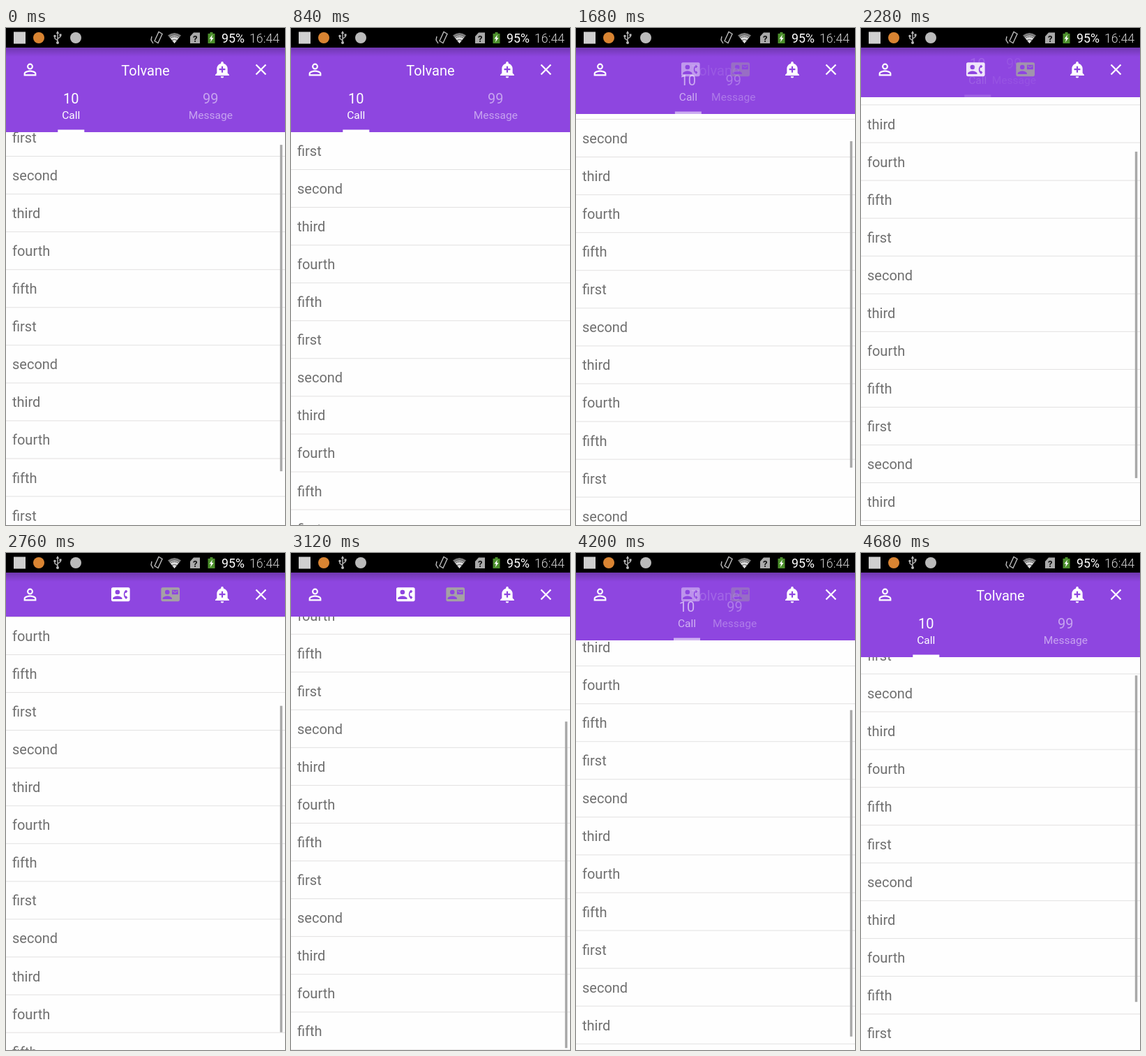
An HTML page for the animation above (4.8 s loop, 400 by 711 pixels).

```html
<!DOCTYPE html>
<html lang="en">
<head>
<meta charset="utf-8">
<title>Collapsing header</title>
<style>
  html, body { margin: 0; width: 100%; height: 100%; overflow: hidden; background: #fefefe; }
  svg { display: block; width: 400px; height: 711px; font: 20px Roboto, sans-serif; fill: #fff; }
  .small { font-size: 15.56px; }
  .mid text { text-anchor: middle; }
  #list text { fill: #707070; }
  #list rect { fill: #e2e1e1; }
</style>
</head>
<body>
<svg viewBox="0 0 400 711">
  <defs>
    <linearGradient id="shade" x2="0" y2="1">
      <stop stop-color="#000" stop-opacity=".22"/>
      <stop offset="1" stop-color="#000" stop-opacity="0"/>
    </linearGradient>
  </defs>

  <g id="list"></g>
  <rect id="bar" x="392.8" width="3.5" height="467" fill="#a9a9a9"/>

  <rect id="header" width="400" fill="#8e46e0"/>
  <rect y="28" width="400" height="13" fill="url(#shade)"/>
  <g class="mid">
    <text id="title" x="200" y="67.5">Tolvane</text>
    <g id="tabs">
      <g id="call">
        <text y="108">10</text>
        <text class="small" y="130.3">Call</text>
        <rect x="-19" y="145.5" width="38" height="3.5"/>
      </g>
      <g id="message" opacity=".5">
        <text y="108">99</text>
        <text class="small" y="130.3">Message</text>
      </g>
    </g>
  </g>
  <g id="fixed" fill-rule="evenodd"></g>
  <g id="fading" fill-rule="evenodd"></g>

  <!-- status bar -->
  <rect width="400" height="28" fill="#000"/>
  <rect x="11" y="5.5" width="17" height="17" fill="#cfcfcf"/>
  <circle cx="47" cy="14" r="8" fill="#d98432"/>
  <g fill="none" stroke="#bbb" stroke-width="1.4">
    <path d="M74 20V7M74 18l-4-3v-3M74 15.5l4-3V10"/>
    <path d="M213 18.5l6-13 5 3-6 13zM209 12l-1 5 3 5"/>
  </g>
  <g fill="#bbb">
    <path d="M71.8 8L74 4l2.2 4z"/>
    <circle cx="74" cy="21" r="2"/>
    <circle cx="70" cy="11.5" r="1.7"/>
    <rect x="76.5" y="8.5" width="3" height="3"/>
    <circle cx="100" cy="14" r="8"/>
  </g>
  <path d="M232 10.5q9.500-7 19 0L241.500 22z" fill="#7b7b7b"/>
  <path d="M234.800 13.500q6.700-5 13.400 0L241.500 22z" fill="#ddd"/>
  <path d="M235.500 14.500q6-4 12 0M238 17.500q3.500-2 7 0" fill="none" stroke="#555"/>
  <path d="M264 12l5-5.500h9V22h-14z" fill="#aaa"/>
  <text x="268" y="19.500" style="font-size:13px;font-weight:700;fill:#111">?</text>
  <path d="M292.500 6h4v2h3v14h-10V8h3z" fill="#4c8f2c"/>
  <path d="M296 9.500l-4.500 6h2.500l-1 5 4.500-6.500H295z"/>
  <text x="309" y="21" style="font-size:17.8px">95%</text>
  <text x="349" y="21" style="font-size:17.8px;font-weight:300;fill:#d0d0d0">16:44</text>
</svg>
<script>
const $ = id => document.getElementById(id);
const set = (id, attrs) => { for (const k in attrs) $(id).setAttribute(k, attrs[k]); };
const clamp = v => Math.max(0, Math.min(1, v));

// Icons are drawn in a 24-unit box
const card = 'M22 3H2C.9 3 0 3.900 0 5v14c0 1.100.9 2 2 2h20c1.100 0 2-.9 2-2V5c0-1.100-.9-2-2-2zM8 6a3 3 0 1 1 0 6 3 3 0 1 1 0-6zm6 12H2v-1c0-2 4-3.100 6-3.100s6 1.100 6 3.100z';
function icon(parent, x, y, d, fill = '#fff') {
  $(parent).insertAdjacentHTML('beforeend',
    `<path transform="translate(${x} ${y}) scale(1.111) translate(-12 -12)" fill="${fill}" d="${d}"/>`);
}
icon('fixed', 34.5, 59.5, 'M12 5.9a2.1 2.1 0 1 1 0 4.2 2.1 2.1 0 0 1 0-4.2m0 9c2.97 0 6.1 1.46 6.1 2.1v1.1H5.9V17c0-.64 3.13-2.1 6.1-2.1M12 4a4 4 0 1 0 0 8 4 4 0 1 0 0-8zm0 9c-2.67 0-8 1.34-8 4v3h16v-3c0-2.66-5.33-4-8-4z');
icon('fixed', 310, 59.2, 'M10 21a2 2 0 0 0 4 0zm8.9-4.200V11c0-3.250-2.250-5.970-5.300-6.690v-.72a1.600 1.600 0 0 0-3.200 0v.72C7.370 5.030 5.120 7.750 5.120 11v5.820L3 18.940V20h18v-1.060zM16 13h-3v3h-2v-3H8v-2h3V8h2v3h3z');
icon('fixed', 365.5, 59.5, 'M19 6.410L17.590 5 12 10.590 6.410 5 5 6.410 10.590 12 5 17.590 6.410 19 12 13.410 17.590 19 19 17.590 13.410 12z');
icon('fading', 164.3, 59.3, card + 'M17.850 14h1.640L21 16l-1.990 1.990a7.500 7.500 0 0 1 0-11.980L21 8l-1.510 2h-1.640a6 6 0 0 0 0 4z');
icon('fading', 235.7, 59.3, card + 'M22 12h-8V6h8zM21 8V7l-3 2-3-2v1l3 2z', '#a5a1a5');

const words = ['first', 'second', 'third', 'fourth', 'fifth'];
const pitch = 54.06;
for (let i = 0; i < 15; i++) {
  const y = i * pitch;
  $('list').insertAdjacentHTML('beforeend',
    `<text x="9" y="${y + 34}">${words[i % 5]}</text><rect y="${y + 53}" width="400" height="1"/>`);
}

// time, list scroll, header bottom
const keys = [
  [0, 19, 149], [720, 19, 149], [840, 0, 149], [960, 0, 149],
  [1680, 46, 123], [2280, 96.6, 99], [2400, 112, 91], [2760, 161.2, 91],
  [3000, 186, 91], [3120, 190.5, 91], [3360, 190.5, 91], [3720, 188.5, 91.3],
  [3960, 170, 101], [4080, 150, 112], [4200, 125, 125], [4440, 71, 149],
  [4560, 46, 149], [4680, 29.5, 149], [4800, 19, 149]
];
function pose(t) {
  const i = keys.findIndex(k => k[0] > t);
  const a = keys[i - 1], b = keys[i], f = (t - a[0]) / (b[0] - a[0]);
  return [1, 2].map(j => a[j] + (b[j] - a[j]) * f);
}

function draw(now) {
  const t = Math.floor(now % 4800 / 120) * 120;
  const [scroll, bottom] = pose(t);
  const p = clamp((149 - bottom) / 58);
  const gap = 26 + 74 * (1 - p) ** 4.1;

  set('list', { transform: `translate(0 ${bottom - scroll})` });
  set('bar', { y: bottom + 3.5 + 0.77 * scroll, opacity: t >= 840 && t < 1080 ? 0 : 1 });
  set('header', { height: bottom });
  set('title', { opacity: clamp(1 - 2 * p) });
  set('tabs', { transform: `translate(193.3 ${bottom - 149})`, opacity: 1 - p });
  set('call', { transform: `translate(${-gap} 0)` });
  set('message', { transform: `translate(${gap} 0)` });
  set('fading', { opacity: p });
  requestAnimationFrame(draw);
}
const start = performance.now();
requestAnimationFrame(() => draw(0));
const loop = draw;
draw = now => loop(Math.max(0, now - start));
</script>
</body>
</html>
```
